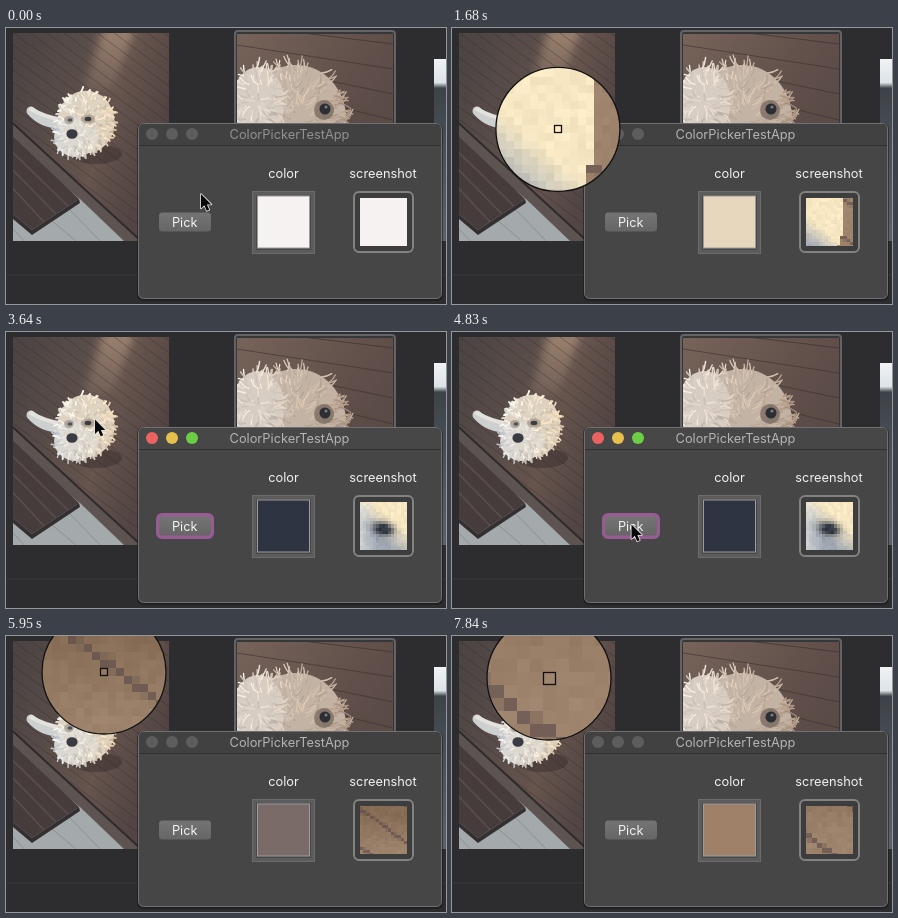
Recreate the animation shown at these times as an HTML page with a canvas. Size 440 by 276 pixels, loop 8000 ms.

```html
<!DOCTYPE html>
<html lang="en">
<head>
<meta charset="utf-8">
<title>Color picker</title>
<style>
  html, body { margin: 0; width: 100%; height: 100%; overflow: hidden; background: #2d2d2f; }
  svg, canvas { position: absolute; left: 0; top: 0; width: 440px; height: 276px; display: block; }
  text { font: 12.8px Inter, sans-serif; fill: #f2f2f2; text-anchor: middle; }
</style>
</head>
<body>
<svg viewBox="0 0 440 276">
  <defs>
    <linearGradient id="deck" gradientUnits="userSpaceOnUse" x1="7" y1="20" x2="163" y2="75">
      <stop offset="0" stop-color="#4b4443"/><stop offset=".45" stop-color="#5b4e4a"/>
      <stop offset=".7" stop-color="#66544d"/><stop offset="1" stop-color="#524543"/>
    </linearGradient>
    <linearGradient id="sun" x2="0" y2="1">
      <stop offset="0" stop-color="#b3967c" stop-opacity=".75"/><stop offset="1" stop-color="#a2897a" stop-opacity=".25"/>
    </linearGradient>
    <linearGradient id="deck2" x2="1" y2="1">
      <stop offset="0" stop-color="#76645a"/><stop offset=".5" stop-color="#5f4e49"/><stop offset="1" stop-color="#524542"/>
    </linearGradient>
    <linearGradient id="trees" x2="0" y2="1">
      <stop offset="0" stop-color="#f0f3f5"/><stop offset=".13" stop-color="#dce3e8"/>
      <stop offset=".16" stop-color="#3d4248"/><stop offset=".4" stop-color="#474d55"/><stop offset="1" stop-color="#5c6269"/>
    </linearGradient>
    <linearGradient id="btn" x2="0" y2="1">
      <stop offset="0" stop-color="#747474"/><stop offset="1" stop-color="#666"/>
    </linearGradient>
    <filter id="soft"><feGaussianBlur stdDeviation=".7"/></filter>
    <filter id="glow" x="-50%" y="-50%" width="200%" height="200%"><feGaussianBlur stdDeviation="4"/></filter>
    <clipPath id="c1"><path d="M7 5H163V213H7Z"/></clipPath>
    <clipPath id="c2"><path d="M231 6H387V213H231Z"/></clipPath>
  </defs>
  <rect width="440" height="276" fill="#2d2d2f"/>
  <path d="M0 247H440" stroke="#38383a"/>

  <g clip-path="url(#c1)">
    <path d="M7 5H163V213H7Z" fill="url(#deck)"/>
    <path d="M97 0H130L106 62H78Z" fill="url(#sun)" filter="url(#glow)"/>
    <path id="planks" stroke="#2e2828" stroke-opacity=".4" stroke-width=".9"/>
    <g filter="url(#soft)">
      <path d="M0 88L135 213H0Z" fill="#5d5452"/>
      <path d="M0 89L135 213" stroke="#2f2a2b" stroke-width="2"/>
      <path d="M58 158L74 171L120 215H0V176Z" fill="#a4aaac"/>
      <path d="M62 180L96 215M7 201L20 215M44 191L72 215" stroke="#8b9092"/>
      <path d="M0 102L73 171L26 202L0 180Z" fill="#463c3c"/>
      <path d="M0 118L62 178M0 135L50 186M0 153L38 194" stroke="#5b4f4d" stroke-width="1.5"/>
      <path d="M73 171L26 202L0 180V185L26 207L74 175Z" fill="#343031"/>
      <ellipse cx="90" cy="126" rx="26" ry="10" fill="#2d2626" opacity=".4"/>
    </g>
    <g id="dog1" fill="none" stroke-linecap="round" filter="url(#soft)"></g>
    <g filter="url(#soft)">
      <ellipse cx="82" cy="91" rx="7" ry="4.5" fill="#a39382" opacity=".7"/>
      <ellipse cx="63" cy="92" rx="5" ry="4" fill="#9b9187" opacity=".7"/>
      <ellipse cx="82" cy="91" rx="3.4" ry="2.2" fill="#3a3c44"/>
      <ellipse cx="64" cy="92" rx="2.4" ry="1.8" fill="#55535a"/>
      <ellipse cx="66" cy="106" rx="5.6" ry="4.8" fill="#393a42"/>
    </g>
  </g>

  <rect x="229" y="3" width="160" height="215" rx="3" fill="#373739" stroke="#636365" stroke-width="2"/>
  <g clip-path="url(#c2)">
    <path d="M231 6H387V213H231Z" fill="url(#deck2)"/>
    <path d="M231 17L387 41M231 -3L387 16M300 48L387 66M330 78L387 92" stroke="#3b302e" stroke-opacity=".6" stroke-width="1.2"/>
    <g id="dog2" fill="none" stroke-linecap="round" filter="url(#soft)"></g>
    <g filter="url(#soft)">
      <ellipse cx="318" cy="82" rx="10" ry="10" fill="#7b6c62" opacity=".8"/>
      <ellipse cx="319" cy="81" rx="5.5" ry="5.5" fill="#2d2d34"/>
      <circle cx="320" cy="79" r="1.5" fill="#77808c"/>
    </g>
  </g>
  <path d="M428 31H440V213H428Z" fill="url(#trees)"/>

  <rect x="131" y="95" width="306" height="178" rx="6" fill="#151516" opacity=".5"/>
  <rect x="132.5" y="95.5" width="303" height="175" rx="5" fill="#464646" stroke="#707070"/>
  <path id="bar" d="M133 117V101Q133 96 138 96H430Q435 96 435 101V117Z"/>
  <path d="M133 117.5H435" stroke="#303030"/>
  <g id="dots"><circle cx="146" cy="106" r="6"/><circle cx="166" cy="106" r="6"/><circle cx="186" cy="106" r="6"/></g>
  <text id="title" x="283.5" y="111">ColorPickerTestApp</text>
  <text x="277.5" y="150">color</text>
  <text x="377" y="150">screenshot</text>
  <rect id="ring" x="150" y="181" width="58" height="26" rx="6" fill="#995b93"/>
  <rect x="153" y="184.5" width="52" height="19" rx="3.5" fill="url(#btn)"/>
  <text x="178.7" y="198.5">Pick</text>
  <rect x="246.5" y="163.5" width="62" height="62" fill="#5c5c5c" stroke="#6c6c6c"/>
  <rect x="250" y="167" width="55" height="55" fill="#484849"/>
  <rect id="well" x="251.5" y="168" width="52" height="52" stroke="#9c9c9c"/>
  <rect x="348" y="164" width="59" height="60" rx="5" fill="#3d3d3d" stroke="#828282" stroke-width="2"/>
</svg>
<canvas width="440" height="276"></canvas>
<script>
const $ = s => document.querySelector(s);
const ctx = $('canvas').getContext('2d');
const LOOP = 8000, LENS = 62, SLOPE = 0.74, GAP = 12.4, FIRST = -37.8;
const clamp = (v, a = 0, b = 1) => Math.max(a, Math.min(b, v));
const mix = (a, b, k) => a.map((v, i) => v + (b[i] - v) * k);
const rgb = c => `rgb(${c.map(Math.round)})`;
const hash = (x, y) => {
  const v = Math.sin(x * 127.1 + y * 311.7) * 43758.5453;
  return v - Math.floor(v);
};

// Shaggy coat: short strokes pointing away from the middle of an ellipse,
// shaded from one colour on the left to another on the right.
function coat(cx, cy, rx, ry, n, len, width, left, right, seed) {
  let s = `<ellipse cx="${cx}" cy="${cy}" rx="${rx * 0.95}" ry="${ry * 0.95}" fill="${rgb(mix(left, right, 0.5))}"/>`;
  for (let i = 0; i < n; i++) {
    const a = hash(i, seed) * Math.PI * 2, r = Math.sqrt(hash(i, seed + 1)) * 0.95;
    const x = cx + Math.cos(a) * rx * r, y = cy + Math.sin(a) * ry * r;
    const b = a + (hash(i, seed + 2) - 0.5) * 1.6, l = len * (0.4 + hash(i, seed + 3) * 0.6);
    const tone = 1.02 + (hash(i, seed + 4) - 0.5) * 0.26 - Math.sin(a) * r * 0.04;
    const c = mix(left, right, clamp(0.5 + Math.cos(a) * r * 0.6)).map(v => Math.min(255, v * tone));
    s += `<path d="M${x.toFixed(1)} ${y.toFixed(1)}q${(Math.cos(b) * l * 0.6).toFixed(1)} ${(Math.sin(b) * l * 0.2).toFixed(1)} ` +
      `${(Math.cos(b) * l).toFixed(1)} ${(Math.sin(b) * l).toFixed(1)}" stroke="${rgb(c)}" stroke-width="${width}"/>`;
  }
  return s;
}

$('#planks').setAttribute('d', Array.from({ length: 24 }, (_, i) => {
  const c = FIRST + (i - 7) * GAP;
  return `M7 ${7 * SLOPE + c}L163 ${163 * SLOPE + c}`;
}).join(''));
$('#dog1').innerHTML =
  '<path d="M55 96Q36 96 25 83" stroke="#ced0d0" stroke-width="9"/><path d="M53 91Q39 89 25 81" stroke="#e4e2dc" stroke-width="4"/>' +
  coat(80, 94, 30, 33, 260, 5, 1.8, [222, 220, 214], [222, 202, 172], 3) +
  coat(70, 109, 23, 21, 150, 5, 1.6, [212, 215, 219], [228, 216, 196], 11);
$('#dog2').innerHTML =
  coat(290, 92, 53, 58, 420, 13, 1.3, [214, 203, 192], [176, 154, 135], 21) +
  coat(252, 75, 28, 38, 180, 12, 1.4, [224, 218, 212], [206, 192, 178], 31);

// Colour of one pixel of the desktop, as seen through the lens.
function pixel(x, y) {
  const n = (hash(x, y) - 0.5) * 14;
  let c;
  if (x < 7 || x > 163 || y < 5 || y > 213) c = [48, 48, 50];
  else if (x > 132 && y > 95) c = [70, 70, 70];
  else if (((x - 78) / 33) ** 2 + ((y - 96) / 37) ** 2 < 1) {
    const dx = x - 82, dy = y - 90;
    c = mix([158, 166, 178], [247, 232, 195], clamp(0.45 + (dx - dy * 1.2) * 0.09));
    c = mix(c, [234, 234, 230], clamp(-0.3 - dx * 0.13));
    c = mix(c, [42, 48, 60], Math.min(0.95, 1.3 * Math.exp(-((dx / 3.2) ** 2) - ((dy - dx * 0.1) / 1.9) ** 2)));
    c = c.map(v => v + n);
  } else {
    const b = clamp(2 * (y - 36), -10, 14);
    c = [144 + b, 117 + b, 95 + b].map(v => v + n * 0.6);
    const d = y - SLOPE * x - FIRST, off = Math.abs(d - Math.round(d / GAP) * GAP);
    c = mix(c, [82, 68, 70], off < 0.5 ? 0.55 : off < 0.75 ? 0.2 : 0);
  }
  return c;
}

// Pixels around (px, py), drawn around (cx, cy).
function pixels(px, py, cx, cy, half, cell) {
  const n = Math.ceil(half / cell);
  px = Math.round(px); py = Math.round(py);
  for (let j = -n; j <= n; j++) for (let i = -n; i <= n; i++) {
    const x = Math.round(cx + (i - 0.5) * cell), y = Math.round(cy + (j - 0.5) * cell);
    ctx.fillStyle = rgb(pixel(px + i, py + j));
    ctx.fillRect(x, y, Math.round(cx + (i + 0.5) * cell) - x, Math.round(cy + (j + 0.5) * cell) - y);
  }
}

// Tracks: time, then x, y, cell size and picked colour.
const pick1 = [[1450, 122, 116, 8, 244, 241, 240], [1800, 100, 96, 8, 226, 207, 170],
  [2170, 85, 88, 8, 165, 168, 174], [2600, 82, 89, 8, 46, 52, 65]];
const pick2 = [[5150, 165, 150, 8, 70, 70, 70], [5600, 108, 58, 8, 146, 119, 97],
  [5950, 98, 36, 8, 122, 106, 104], [6500, 96, 40, 8, 150, 122, 100], [6900, 97, 42, 13, 159, 129, 106]];
const arrow = [[2800, 86, 89], [3640, 89, 87.5], [3850, 92, 91], [4550, 179.5, 192.5]];

function at(track, t) {
  const i = track.findIndex(k => k[0] > t);
  if (i === 0) return track[0].slice(1);
  if (i < 0) return track[track.length - 1].slice(1);
  const a = track[i - 1], b = track[i], k = (t - a[0]) / (b[0] - a[0]);
  return mix(a, b, k * k * (3 - 2 * k)).slice(1);
}

function cursor(x, y) {
  ctx.save();
  ctx.translate(x, y);
  const p = new Path2D('M0 0V14.4L3.3 11.3L5.7 16.8L8.2 15.7L5.9 10.4H10.3Z');
  ctx.lineWidth = 1.6;
  ctx.lineJoin = 'round';
  ctx.strokeStyle = '#e8e8e8';
  ctx.fillStyle = '#080808';
  ctx.stroke(p);
  ctx.fill(p);
  ctx.restore();
}

function lens([x, y, cell]) {
  ctx.save();
  ctx.beginPath();
  ctx.arc(x, y, LENS, 0, Math.PI * 2);
  ctx.save();
  ctx.clip();
  pixels(x, y, x, y, LENS, cell);
  ctx.restore();
  ctx.strokeStyle = '#111';
  ctx.lineWidth = 1.3;
  ctx.stroke();
  ctx.strokeRect(Math.round(x - cell / 2) + 0.5, Math.round(y - cell / 2) + 0.5, cell - 1, cell - 1);
  ctx.restore();
}

const dots = [...$('#dots').children], lights = ['#ed6261', '#e6c04a', '#6bce45'];

function draw(t) {
  const active = t >= 2800 && t < 5000;
  const view = t >= 5150 ? at(pick2, t) : at(pick1, t);
  const live = t >= 1450;

  dots.forEach((d, i) => d.setAttribute('fill', active ? lights[i] : '#5d5d5d'));
  $('#bar').setAttribute('fill', active ? '#474747' : '#414141');
  $('#title').style.fill = t < 700 ? '#929292' : '#b4b4b4';
  $('#ring').style.display = active ? '' : 'none';
  $('#well').setAttribute('fill', live ? rgb(view.slice(3)) : '#f5f2f1');

  ctx.clearRect(0, 0, 440, 276);
  ctx.save();
  ctx.beginPath();
  ctx.rect(354, 170, 47, 48);
  ctx.clip();
  if (live) pixels(view[0], view[1], 377.5, 194, 24, view[2] * 48 / (2 * LENS));
  else {
    ctx.fillStyle = '#f5f2f1';
    ctx.fillRect(354, 170, 47, 48);
  }
  ctx.restore();

  if (t < 700) cursor(195, 166);
  else if (active) cursor(...at(arrow, t));
  else if (live) lens(view);
}

function tick() {
  draw(performance.now() % LOOP);
  requestAnimationFrame(tick);
}
tick();
</script>
</body>
</html>
```
